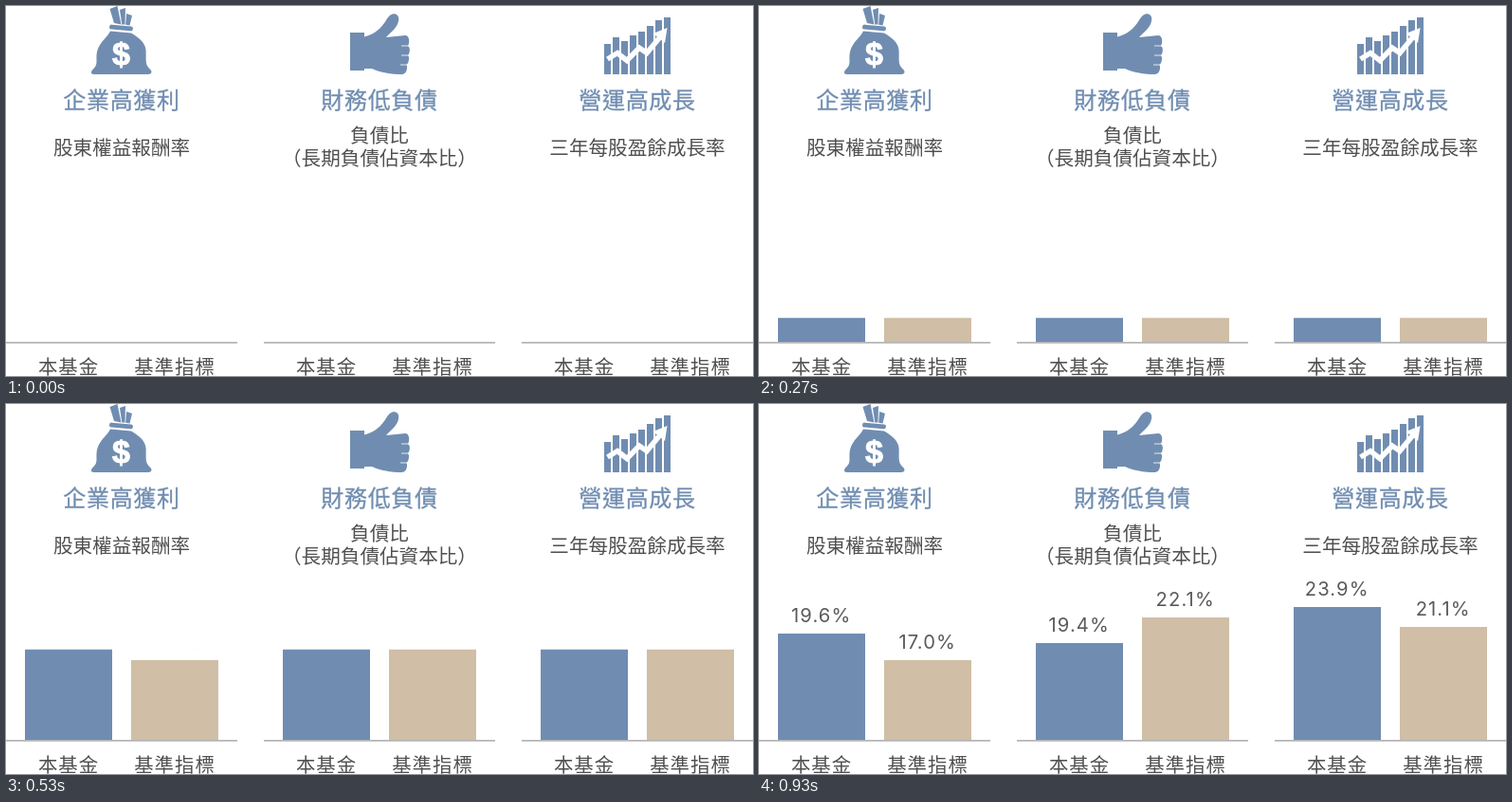
An HTML page for the animation above (1.03 s loop, 788 by 390 pixels).

```html
<!DOCTYPE html>
<html lang="zh-Hant">
<head>
<meta charset="utf-8">
<title>基金指標</title>
<style>
  html, body { margin: 0; width: 100%; height: 100%; overflow: hidden; background: #fff; }
  svg { display: block; }
  text { text-anchor: middle; font-family: "Noto Sans CJK TC", "Noto Sans CJK", sans-serif; fill: #505050; }
  .title { font-size: 24px; letter-spacing: .7px; fill: #708db1; stroke: #708db1; stroke-width: .3px; }
  .sub { font-size: 20.6px; }
  .label { font-size: 20.4px; letter-spacing: 1px; }
  .value { font: 400 20.2px Inter, "Liberation Sans", sans-serif; letter-spacing: 1.1px; fill: #5a5a5a; }
  .dollar { font: bold 34px "Liberation Sans", Arial, sans-serif; fill: #fff; stroke: #fff; stroke-width: 1px; }
  .icon, .fund { fill: #708db1; }
  .base { fill: #d0bea6; }
  .axis { fill: #b4b4b4; }
  .cut { fill: none; stroke: #fff; }
</style>
</head>
<body>
<svg width="788" height="390" viewBox="0 0 788 390">
  <defs>
    <clipPath id="wipe"><rect id="mask" x="0" y="354" width="788" height="0"/></clipPath>
  </defs>

  <g class="icon">
    <path d="M109.5 3L117.5 0L121.5 19.500L114 18Z M120 4L126 2L125.500 19.500H122.300Z M127 8L133 10L130.500 20.500L126.200 19.800Z"/>
    <rect x="109" y="20.500" width="25" height="5" rx="2.500" transform="rotate(5 121.500 23)"/>
    <path d="M110 26.500L132 28.500C140 33 147 39 147.500 46C148 52 147 58 148.500 62C150 66 154 67 153.500 70Q153 72 150 72H93Q89.500 72 90 69.500C91 66 95.500 65 95.500 59C95.500 54 95 50 97 45C100 37 107 33 110 26.500Z"/>
    <text class="dollar" x="121.500" y="62">$</text>
  </g>

  <g class="icon">
    <path d="M363 28H378V32.500C389 30 396 23 401 15C404 10 408 7 412 9C415.500 11 414.500 17 412 21C409 26 404 29 401 33L421 31C426 31 426 39 424 42C427 44 426 50 424 52C426 54 425 60 422.500 62C424 65 422.500 71.500 418 72C406 72 395 70 386 66H378V68H363Z"/>
    <path class="cut" stroke-width=".8" d="M417 42H426M417 52H426M416 62H425"/>
  </g>

  <g class="icon">
    <path d="M631 40h7v32h-7z M640 33h7v39h-7z M649 37h7v35h-7z M658 31h7v41h-7z M667 27h7v45h-7z M676 21h7v51h-7z M685 15h7v57h-7z M694 12h7v60h-7z"/>
    <path class="cut" stroke-width="5.500" d="M634.500 56L645 49.500L655 57.500L668 44L676 49.500L691 31.500"/>
    <path fill="#fff" d="M697.500 23L682.500 29L695 39Z"/>
  </g>

  <g id="words"></g>
  <g id="bars" clip-path="url(#wipe)"></g>
</svg>
<script>
  const FLOOR = 354, RISE = 171, LOOP = 1030, STEPS = 30;
  const columns = [
    { title: '企業高獲利', sub: ['股東權益報酬率'], bars: [['19.6%', 242], ['17.0%', 270]] },
    { title: '財務低負債', sub: ['負債比', '（長期負債佔資本比）'], bars: [['19.4%', 252], ['22.1%', 225]] },
    { title: '營運高成長', sub: ['三年每股盈餘成長率'], bars: [['23.9%', 214], ['21.1%', 235]] }
  ];
  const kinds = [['fund', '本基金'], ['base', '基準指標']];

  const text = (cls, x, y, s) => `<text class="${cls}" x="${x}" y="${y}">${s}</text>`;
  const rect = (cls, x, y, w, h) => `<rect class="${cls}" x="${x}" y="${y}" width="${w}" height="${h}"/>`;

  let words = '', bars = '';
  columns.forEach(({ title, sub, bars: pair }, i) => {
    const left = i * 272, mid = left + 122;
    words += text('title', mid, 108, title) + rect('axis', left, FLOOR, 244, 1.7);
    const first = sub.length > 1 ? 144.4 : 156.5;
    sub.forEach((s, k) => { words += text('sub', mid, first + k * 24, s); });
    pair.forEach(([value, top], k) => {
      const x = left + 20 + k * 112, [cls, label] = kinds[k];
      words += text('label', x + 46, 388, label);
      bars += rect(cls, x, top, 92, FLOOR - top) + text('value', x + 45.7, top - 12, value);
    });
  });
  document.getElementById('words').innerHTML = words;
  document.getElementById('bars').innerHTML = bars;

  // cubic-bezier(.42, 0, .58, 1)
  function easeInOut(x) {
    let lo = 0, hi = 1;
    for (let i = 0; i < 30; i++) {
      const u = (lo + hi) / 2, v = 1 - u;
      if (1.26 * u * v * v + 1.74 * u * u * v + u * u * u < x) lo = u; else hi = u;
    }
    return lo * lo * (3 - 2 * lo);
  }

  const mask = document.getElementById('mask');
  const start = performance.now();
  function draw() {
    const t = (performance.now() - start) % LOOP;
    // 30 steps a second, aligned to hundredths
    const step = Math.min(STEPS, Math.floor((Math.floor(t / 10) * 10 + 5) * 0.03));
    const h = step ? RISE * easeInOut(step / STEPS) : 0;
    mask.setAttribute('y', FLOOR - h);
    mask.setAttribute('height', h);
    requestAnimationFrame(draw);
  }
  draw();
</script>
</body>
</html>
```
